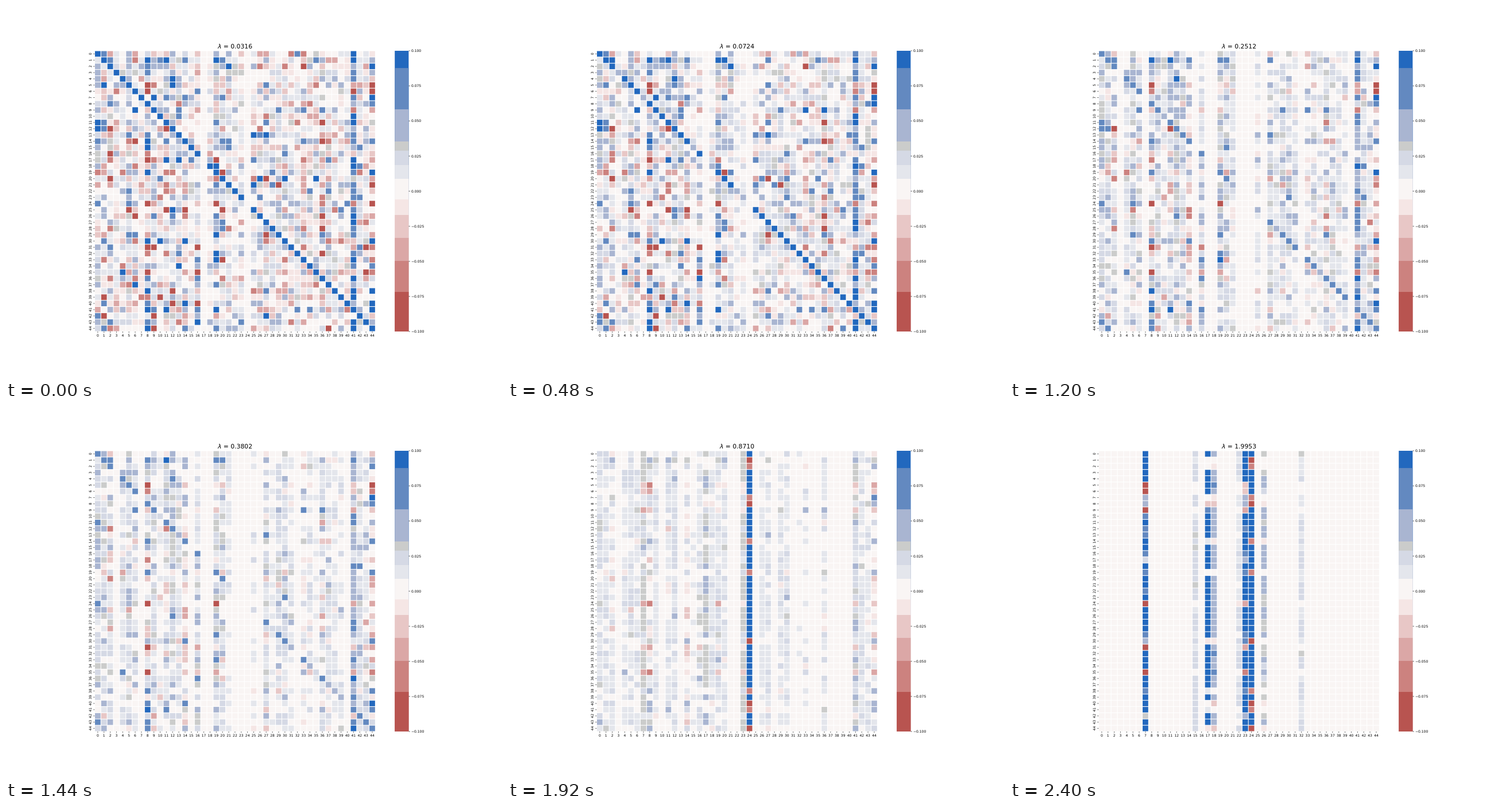
An HTML page for the animation above (2.64 s loop, 864x648 px).

```html
<!DOCTYPE html>
<html lang="en">
<head>
<meta charset="utf-8">
<title>Coefficient heatmap</title>
<style>
  html, body { margin: 0; width: 100%; height: 100%; overflow: hidden; background: #fff; }
  svg { display: block; width: 864px; height: 648px; }
  text { font-family: "DejaVu Sans", sans-serif; font-size: 6px; fill: #000; }
  .mid { text-anchor: middle; }
  #title { font-size: 10.8px; }
</style>
</head>
<body>
<svg id="stage" viewBox="0 0 864 648"></svg>
<script>
const N = 45, STEP = 240, STEPS = 11;
const X0 = 154.4, Y0 = 78, SIZE = 489, P = SIZE / N;
const stage = document.getElementById('stage');

function add(tag, attrs, text) {
  const el = document.createElementNS('http://www.w3.org/2000/svg', tag);
  for (const name in attrs) el.setAttribute(name, attrs[name]);
  if (text !== undefined) el.textContent = text;
  return stage.appendChild(el);
}

// Lower limit of each colour band, in hundredths.
const bands = [
  [8.77, '#2268be'], [5.83, '#6389c0'], [3.54, '#a9b5d1'], [2.88, '#cbcccb'],
  [1.86, '#d5d9e5'], [0.88, '#e4e6ec'], [-0.59, '#f9f5f4'], [-1.7, '#f5e6e5'],
  [-3.33, '#e8c7c6'], [-4.97, '#dba7a6'], [-7.18, '#cc827f'], [-10, '#b85450']
];
const colour = v => (bands.find(b => v >= b[0]) || bands[bands.length - 1])[1];

const clamp = u => Math.max(0, Math.min(1, u));
function rand(i, j, s) {
  const x = Math.sin(i * 127.1 + j * 311.7 + s * 74.7) * 43758.5453;
  return x - Math.floor(x);
}
const bell = (i, j, s) => (rand(i, j, s) + rand(i, j, s + 1) + rand(i, j, s + 2) - 1.5) * 2;

// Two row patterns shared by the columns, each with a few rows of opposite sign.
const rows = [...Array(N).keys()];
const opposite = { A: [1, 2, 7, 8, 14, 19, 30, 38, 40, 41, 44], B: [5, 6, 9, 24, 31, 35] };
const A = rows.map(i => opposite.A.includes(i) ? 0.7 + 0.7 * rand(i, 50, 1) : -1 + 0.15 * bell(i, 50, 1));
const B = rows.map(i => opposite.B.includes(i) ? -0.7 - 0.5 * rand(i, 51, 1) : 1 - 0.9 * rand(i, 51, 5) ** 5);

// Columns that follow the patterns: mean, share of A, share of B.
const early = { 8: [0, 4, 6], 14: [3, 4, 0], 19: [0, 0, 4], 41: [1, 0, 7], 44: [2, 5, 3] };
const late = {
  7: [0, 0, 10], 15: [1.5, 0, 1], 17: [5, -5, 0], 18: [2, -3, 0], 22: [1, 0, 0.8],
  23: [3, 0, 7], 24: [3, -10, 0], 26: [1.8, -1.8, 0], 32: [1, 0, 1]
};
const LEAD = 24;
const mix = ([m, a, b], i) => m + a * A[i] + b * B[i];

// Step at which a column has faded out; the rest last until the end.
const fades = { 0: [17, 24], 3: [3, 7, 15, 18, 22, 23], 5: [26, 32, 40], 7: [10, 21, 25, 28, 35], 8: [13, 31, 34, 37, 38, 39] };
const end = Array(N).fill(10);
for (const step in fades) for (const j of fades[step]) end[j] = +step;

function fading(i, j, k) {
  if (k >= end[j]) return 0;
  const s = (0.4 + 0.06 * end[j]) * (1 - (k / end[j]) ** 2.5);
  if (i === j) return 18 * s * (1 - k / 12);
  const base = early[j] || [0.8 + 0.25 * k, 0.7 * bell(j, 7, 5), 0.7 * bell(j, 7, 8)];
  const turn = k * 0.1;
  const n = bell(i, j, 20) * Math.cos(turn) + bell(i, j, 30) * Math.sin(turn);
  const spread = (2.2 + 1.6 * rand(j, 7, 14)) * (1 - 0.06 * k);
  return s * (mix(base, i) + spread * n * (0.6 + 0.4 * Math.abs(n)));
}

function rising(i, j, k) {
  const u = clamp((k - 7) / (j === LEAD ? 1 : 3));
  return u * (mix(late[j], i) + 0.5 * bell(i, j, 40));
}

const value = (i, j, k) => fading(i, j, k) + (late[j] ? rising(i, j, k) : 0);

const cells = [];
for (const i of rows) {
  const cx = X0 + (i + 0.5) * P, cy = Y0 + (i + 0.5) * P;
  for (const j of rows)
    cells.push(add('rect', { x: X0 + j * P + 0.55, y: Y0 + i * P + 0.55, width: P - 1.1, height: P - 1.1 }));
  add('path', { d: `M${cx} ${Y0 + SIZE}v2.2M${X0} ${cy}h-2.2`, stroke: '#000', 'stroke-width': 0.6 });
  add('text', { class: 'mid', x: cx, y: 575.7 }, i);
  add('text', { class: 'mid', transform: `translate(148.6 ${cy}) rotate(-90)` }, i);
}

// Each band reaches to the bottom, so no seams show between them.
const barY = v => Y0 + (10 - v) / 20 * SIZE;
bands.forEach(([, fill], n) => {
  const top = n ? barY(bands[n - 1][0]) : Y0;
  add('rect', { x: 677.2, y: top, width: 24.2, height: Y0 + SIZE - top, fill });
});
for (let v = -10; v <= 10; v += 2.5) {
  add('path', { d: `M701.5 ${barY(v)}h2.4`, stroke: '#000', 'stroke-width': 0.6 });
  add('text', { x: 706, y: barY(v) + 2.2 }, (v < 0 ? '\u2212' : '') + (Math.abs(v) / 100).toFixed(3));
}

const title = add('text', { id: 'title', class: 'mid', x: 399, y: 74.3 });
const lambda = document.createElementNS(stage.namespaceURI, 'tspan');
lambda.setAttribute('font-style', 'italic');
lambda.textContent = 'λ';
const amount = document.createTextNode('');
title.append(lambda, amount);

let shown = -1;
function draw(k) {
  if (k === shown) return;
  shown = k;
  amount.data = ' = ' + (10 ** (-1.5 + 0.18 * k)).toFixed(4);
  cells.forEach((cell, n) => cell.setAttribute('fill', colour(value(Math.floor(n / N), n % N, k))));
}

const start = performance.now();
function tick() {
  draw(Math.floor((performance.now() - start) / STEP) % STEPS);
  requestAnimationFrame(tick);
}
tick();
</script>
</body>
</html>
```
